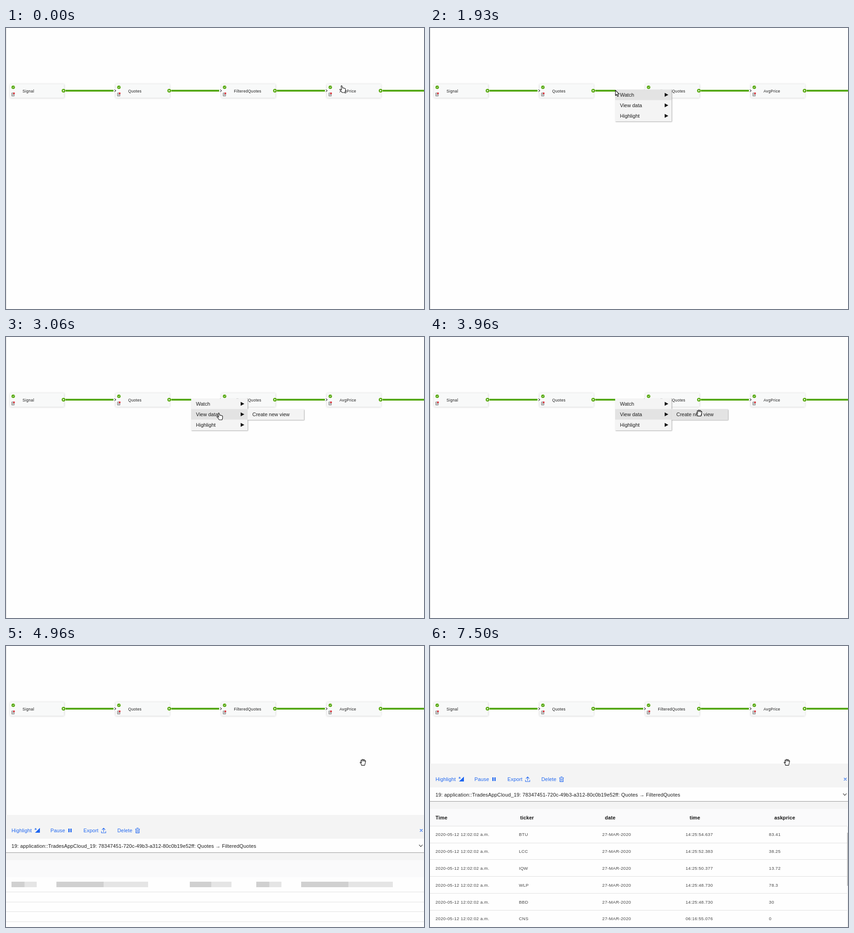
An HTML page with a canvas that plays this animation: 912 px wide and 614 px high, repeating every 8000 ms.

```html
<!DOCTYPE html>
<html lang="en">
<head>
<meta charset="utf-8">
<title>Stream graph</title>
<style>
  html, body { margin: 0; width: 100%; height: 100%; overflow: hidden; background: #fefefe; }
  canvas { display: block; }
</style>
</head>
<body>
<canvas id="stage" width="912" height="614"></canvas>
<script>
const ctx = document.getElementById('stage').getContext('2d');
const LOOP = 8000, W = 912, H = 614;
const GREEN = '#55a80d', BLUE = '#1f66f0', INK = '#1c1c1c';

const clamp = v => Math.max(0, Math.min(1, v));
const smooth = v => v * v * (3 - 2 * v);

function box(x, y, w, h, fill) {
  ctx.fillStyle = fill;
  ctx.fillRect(x, y, w, h);
}

// Text is placed by its left edge and the middle of its capitals.
function text(str, x, midY, size = 11, color = INK, spacing = 0, weight = 400) {
  ctx.font = `${weight} ${size}px "Liberation Sans", Arial, sans-serif`;
  ctx.letterSpacing = spacing + 'px';
  ctx.fillStyle = color;
  ctx.fillText(str, x, midY + size * 0.36);
}

function shape(d, x, y, { fill, stroke, width = 1 }) {
  const path = new Path2D(d);
  ctx.save();
  ctx.translate(x, y);
  ctx.lineJoin = ctx.lineCap = 'round';
  if (fill) { ctx.fillStyle = fill; ctx.fill(path); }
  if (stroke) { ctx.strokeStyle = stroke; ctx.lineWidth = width; ctx.stroke(path); }
  ctx.restore();
}

function disc(x, y, r, fill) {
  ctx.fillStyle = fill;
  ctx.beginPath();
  ctx.arc(x, y, r, 0, 7);
  ctx.fill();
}

// ---- graph ----
function drawNode(label, i) {
  const x = 8 + i * 230.6;
  ctx.save();
  ctx.shadowColor = 'rgba(0,0,0,.2)';
  ctx.shadowBlur = 4;
  box(x + 0.5, 122.5, 118, 30, '#f8f9f9');
  ctx.restore();

  disc(x + 7.7, 129.5, 3.8, GREEN);
  shape('M-1.7 0 L-.4 1.3 L1.8 -1.2', x + 7.7, 129.5, { stroke: '#fff' });
  shape('M-2.5 -3 H2.5 V3.7 H-2.5 Z M-1 -.5 H1 M-1 1.5 H.5', x + 7.5, 145, { stroke: '#555', width: 0.9 });
  disc(x + 9.4, 142.7, 2, '#e0343c');

  text(label, x + 28, 137.5, 8.5, INK, 0.3);
  if (i) {
    box(x - 4, 133, 7, 8, '#fefefe');
    shape('M-1.4 -2.4 L1.4 0 L-1.4 2.4', x - 0.3, 137, { stroke: '#333', width: 1.1 });
  }
  disc(x + 117.5, 137, 4, GREEN);
  shape('M-1.3 -2.1 L2.1 0 L-1.3 2.1 Z', x + 117.5, 137, { fill: '#fff' });
}

function drawGraph() {
  box(0, 0, W, H, '#fefefe');
  box(0, 0, 1, H, '#dcdcdc');
  for (let i = 0; i < 4; i++) box(130 + i * 230.6, 135, 106, 4, GREEN);
  ['Signal', 'Quotes', 'FilteredQuotes', 'AvgPrice'].forEach(drawNode);
}

// ---- context menu ----
const ROW = 23;

function drawMenu(items, x, y, w, active, arrows) {
  ctx.save();
  ctx.shadowColor = 'rgba(0,0,0,.35)';
  ctx.shadowBlur = 2;
  ctx.shadowOffsetX = ctx.shadowOffsetY = 1;
  box(x, y, w, items.length * ROW + 0.5, '#f4f4f4');
  ctx.restore();
  items.forEach((item, i) => {
    const top = y + i * ROW, mid = top + 11.5;
    if (i === active) box(x, top, w, ROW, '#e3e3e3');
    text(item, x + 10.5, mid);
    if (arrows) shape('M0 -4.3 L8 0 L0 4.3 Z', x + 108, mid, { fill: '#161616' });
  });
}

function drawMenus(t, cursor) {
  if (t < 1930 || t >= 4060) return;
  const row = cursor.y < 157.5 ? 0 : 1;
  drawMenu(['Watch', 'View data', 'Highlight'], 404, 134.5, 123, row, true);
  if (t >= 3060) {
    drawMenu(['Create new view'], 527, 157.5, 123, cursor.x > 527 ? 0 : -1);
  } else if (t >= 2430) {
    drawMenu(['Throughput', 'Congestion', 'Queue size', 'Errors', 'Latency',
      'Tuples in', 'Tuples out', 'Connections'], 527, 134.5, 139, -1);
  }
}

// ---- data panel ----
const ROWS = [
  ['BTU', '14:25:54.637', '83.41'],
  ['LCC', '14:25:52.383', '38.25'],
  ['IQW', '14:25:50.377', '13.72'],
  ['WLP', '14:25:48.730', '78.3'],
  ['BBD', '14:25:48.730', '30'],
  ['CNS', '06:16:55.076', '0']
];

function drawToolbar(top) {
  const mid = top + 34, line = { stroke: BLUE, width: 1.1 };
  [['Highlight', 12], ['Pause', 97], ['Export', 169], ['Delete', 243]]
    .forEach(([label, x]) => text(label, x, mid, 11, BLUE, 0.16));
  text('a', 62.5, mid - 3.5, 7.5, BLUE, 0, 700);
  shape('M6 -6 V5 H-5 Z', 68, mid, { fill: BLUE });
  shape('M-4 4 L6 -6', 68, mid, { stroke: '#fff', width: 0.7 });
  box(136, mid - 4, 2.7, 8, BLUE);
  box(140.5, mid - 4, 2.7, 8, BLUE);
  shape('M0 3 V-5 M-3.3 -1.7 L0 -5 L3.3 -1.7 M-4.7 2 V5.3 H4.7 V2', 213, mid, line);
  shape('M-4.7 -3 H4.7 M-1.7 -5.2 H1.7 M-3.6 -3 V5.4 H3.6 V-3 M-1.2 -.5 V3 M1.2 -.5 V3', 287, mid, line);
  shape('M-2.5 -2.5 L2.5 2.5 M2.5 -2.5 L-2.5 2.5', 906, mid, line);
}

function drawSkeleton(t) {
  const grow = smooth(clamp((t - 4655) / 600));
  [[12, 55], [110, 200], [401, 91], [546, 55], [644, 200]].forEach(([x, w]) => {
    box(x, 515, w, 12, '#e5e5e5');
    ctx.globalAlpha = 0.3 + 0.7 * grow;
    box(x, 515, w * grow, 12, '#c6c6c6');
    ctx.globalAlpha = 1;
  });
  for (let i = 0; i < 4; i++) box(0, Math.round(537.3 + i * 21.4), W, 1, '#e0e0e0');
}

function drawTable() {
  ['Time', 'ticker', 'date', 'time', 'askprice']
    .forEach((name, i) => text(name, 12 + i * 184.8, 375, 11, '#161616', 0.1, 700));
  ROWS.forEach(([ticker, time, price], i) => {
    const mid = 412 + i * 36.8;
    box(0, Math.round(392.6 + i * 36.9), 910, 1, '#e0e0e0');
    ['2020-05-12 12:02:02 a.m.', ticker, '27-MAR-2020', time, price]
      .forEach((cell, c) => text(cell, 12 + c * 181.9, mid, 9.5, '#454545', 0.34));
  });
  box(910, 394, 2, 220, '#f1f1f1');
  box(910, 408, 2, 116, '#bcbcbc');
}

function drawPanel(t) {
  if (t < 4700) return;
  const loaded = t >= 5430, top = loaded ? 257 : 369;
  box(0, top, W, H - top, '#f4f4f4');
  drawToolbar(top);
  box(0, top + 52, W, 30, '#fefefe');
  box(0, top + 82, W, 1, '#979797');
  text('19: application::TradesAppCloud_19: 78347451-720c-49b3-a312-80c0b19e52ff: Quotes → FilteredQuotes',
    12, top + 68, 11, INK, 0.17);
  shape('M-3.5 -1.8 L0 1.8 L3.5 -1.8', 905, top + 67.5, { stroke: '#333', width: 1.1 });
  box(0, top + 99, W, 37, '#fafafb');
  box(0, top + 136, W, H, '#fefefe');
  if (loaded) drawTable();
  else drawSkeleton(t);
}

// ---- cursor ----
const TRACK = [
  [0, 732, 126], [60, 732, 126], [250, 590, 89], [470, 362, 125], [600, 395, 140], [660, 404, 136],
  [2200, 404, 136], [2660, 464, 166], [3130, 464, 166], [3460, 587, 166],
  [4060, 587, 166], [4430, 778.5, 254], [LOOP, 778.5, 254]
];

const CURSORS = {
  arrow: 'M.5 0 V11.5 L3.2 9 L5.2 13.6 L7.2 12.7 L5.2 8.3 H8.8 Z',
  pointer: 'M-1 1 Q0 -.8 1.3 1 L2.3 5.2 Q3.8 4.2 4.6 5.5 Q6 4.7 6.7 6.1 Q8.4 5.6 8.6 7.6 '
    + 'L8.5 11.5 L7.3 15 H1.2 L-1.2 11.5 L-3.7 8.8 Q-3.6 7.3 -2 7.9 L.3 9.3 Z',
  grab: 'M-3 6.6 L-3.4 4 L-6 .7 Q-5.6 -1.3 -3.8 .2 L-2.7 1.3 L-4.3 -3.8 Q-3.6 -6 -2.1 -4.3 '
    + 'L-1.4 -2.2 L-1.6 -5.3 Q-.3 -7.4 .9 -5.3 L1.1 -2.2 L1.9 -5.2 Q3.4 -6.7 4 -4.7 '
    + 'L3.8 -1.7 L4.6 -3.2 Q6.2 -3.9 6.2 -1.9 L4.9 3.2 L4.1 6.6 Z'
};

function cursorAt(t) {
  const i = TRACK.findIndex(key => key[0] > t);
  const [t0, x0, y0] = TRACK[i - 1], [t1, x1, y1] = TRACK[i];
  let p = (t - t0) / (t1 - t0);
  if (t > 660) p = smooth(p);
  const kind = t < 100 ? 'pointer' : t < 930 ? 'grab' : t < 2200 ? 'arrow' : t < 3960 ? 'pointer' : 'grab';
  return { x: x0 + (x1 - x0) * p, y: y0 + (y1 - y0) * p, kind };
}

function frame(now) {
  const t = now % LOOP, cursor = cursorAt(t);
  drawGraph();
  drawMenus(t, cursor);
  drawPanel(t);
  shape(CURSORS[cursor.kind], cursor.x, cursor.y, { fill: '#fff', stroke: '#111', width: 1.1 });
  requestAnimationFrame(frame);
}
requestAnimationFrame(frame);
</script>
</body>
</html>
```
